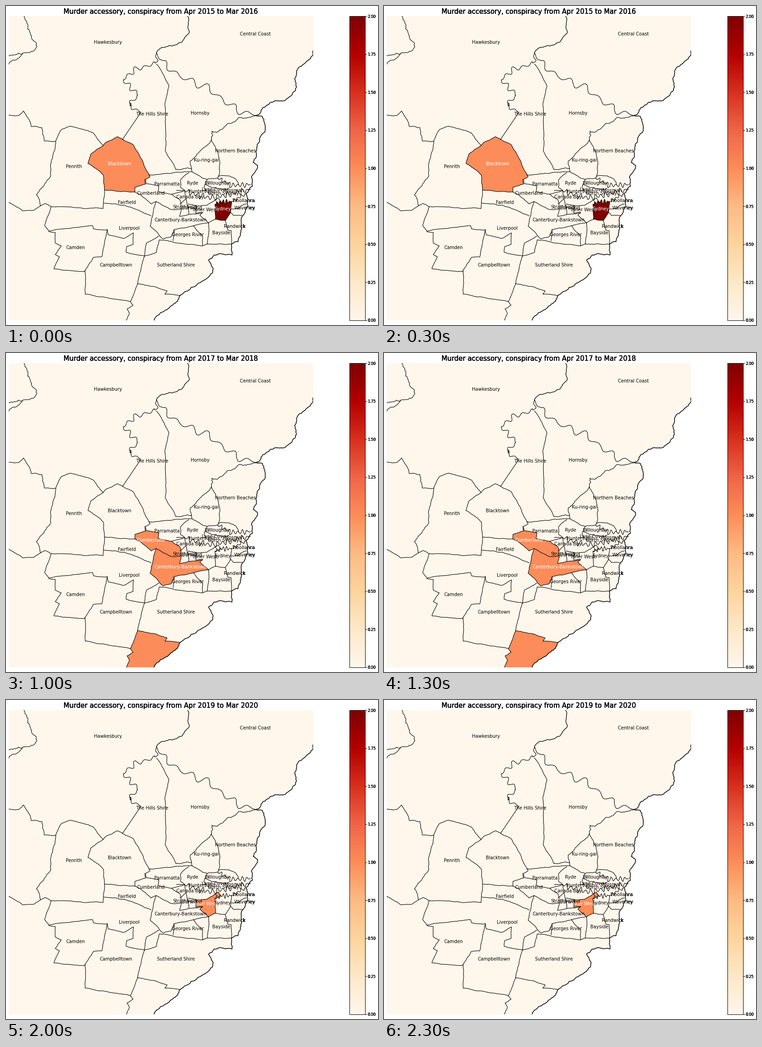
Animation, 808 px wide and 693 px high, one loop 2.5 s. Source, as a matplotlib script:

```python
import matplotlib.pyplot as plt
import numpy as np
from matplotlib.animation import FuncAnimation
from matplotlib.patches import Polygon, Rectangle

W, H, DPI = 808, 693, 64
PT = 72 / DPI  # points per pixel
LEFT, TOP, RIGHT, BOTTOM = 6, 22, 667, 683
OVERDRAW = 4  # repeated drawing makes some text heavier

# Largest sideways shift of a segment's middle, as a share of its length
CALM, COAST = 0.05, 0.15

plt.rcParams["font.family"] = "DejaVu Sans"
rng = np.random.default_rng(11)
cmap = plt.get_cmap("OrRd")

fig = plt.figure(figsize=(W / DPI, H / DPI), dpi=DPI, facecolor="white")
ax = fig.add_axes([0, 0, 1, 1])
ax.axis("off")
frame = Rectangle((LEFT, TOP), RIGHT - LEFT, BOTTOM - TOP, fc="none", ec="none")
ax.add_patch(frame)

arcs = {}


def fractal(a, b, rough):
    """Points from a up to b, split by random midpoint displacement."""
    d = b - a
    length = np.hypot(*d)
    if length < 4:
        return [a]
    shift = rough * min(length, 25) * rng.uniform(-1, 1)
    mid = (a + b) / 2 + np.array([-d[1], d[0]]) / length * shift
    return fractal(a, mid, rough) + fractal(mid, b, rough)


def draw(name, path, width):
    arcs[name] = path
    line, = ax.plot(*path.T, color="black", lw=width * PT, zorder=3)
    line.set_clip_path(frame)


def border(name, *pts, rough=CALM, width=1.1):
    """A land border or coast through a few key points."""
    pts = np.array(pts, float)
    path = [p for a, b in zip(pts, pts[1:]) for p in fractal(a, b, rough)]
    draw(name, np.array(path + [pts[-1]]), width)


def river(name, *pts, swing, period):
    """A line that swings in waves about its key points."""
    pts = np.array(pts, float)
    dist = np.r_[0, np.cumsum(np.hypot(*np.diff(pts, axis=0).T))]
    s = np.linspace(0, dist[-1], int(dist[-1]))
    path = np.column_stack([np.interp(s, dist, c) for c in pts.T])
    tangent = np.gradient(path, axis=0)
    tangent /= np.hypot(*tangent.T)[:, None]
    normal = tangent[:, ::-1] * [-1, 1]
    turn = 2 * np.pi * s / period
    fade = np.clip(np.minimum(s, s[-1] - s) / period, 0, 1)
    wave = swing * fade * np.sin(turn) * (1 + 0.5 * np.sin(0.37 * turn))
    draw(name, path + normal * wave[:, None], 1.1)


def join(*parts):
    """Chain arcs and points into an outline; a leading '-' reverses an arc."""
    out = []
    for part in parts:
        if isinstance(part, tuple):
            out.append([part])
        elif part[0] == "-":
            out.append(arcs[part[1:]][::-1])
        else:
            out.append(arcs[part])
    return np.vstack(out)


def area(*parts, zorder=2):
    patch = Polygon(join(*parts), fc=cmap(0.0), ec="none", zorder=zorder)
    ax.add_patch(patch)
    patch.set_clip_path(frame)
    return patch


def write(x, y, text, px, ha="center", va="baseline", zorder=5):
    return ax.text(x, y, text, fontsize=px * PT, ha=ha, va=va, zorder=zorder)


# Coast, north to south
coast = dict(rough=COAST, width=1.5)
border("coast_n", (675, 88), (667, 97), (656, 118), (636, 133), (627, 158),
       (631, 176), (611, 201), (575, 209), (543, 238), **coast)
border("coast_m", (543, 238), (557, 240), (563, 267), (549, 297), (537, 340),
       (546, 346), (533, 372), (535, 392), (521, 408), **coast)
border("coast_e", (521, 408), (525, 432), (511, 462), (510, 488), (504, 512),
       (490, 517), (491, 541), (452, 541), (440, 552), (450, 572), (428, 597),
       (378, 629), **coast)
border("coast_s", (378, 629), (342, 664), (322, 683), (314, 692), **coast)

# North
border("hawk_west", (33, 15), (47, 50), (66, 80), (61, 97), (36, 103),
       (0, 107), rough=0.2)
border("hawk_fork", (36, 103), (14, 118), (0, 140), rough=COAST)
border("hawk_cc", (399, 10), (397, 60), (372, 83), (338, 90), (327, 102),
       rough=COAST, width=1.3)
river("cc_horn", (327, 102), (340, 122), (376, 152), (436, 177), (480, 210),
      (500, 225), (543, 238), swing=6, period=36)
river("hawk_hills", (327, 102), (325, 125), (281, 138), (254, 160), (288, 194),
      (266, 215), (293, 231), swing=4, period=21)
border("hills_sw", (293, 231), (253, 290), rough=0)
border("hills_horn", (327, 126), (337, 140), (354, 174), (345, 215),
       (346, 315), (369, 355))
border("horn_kur", (369, 355), (403, 353), (400, 337), (424, 313), (446, 291),
       rough=0.1)
border("horn_beach", (446, 291), (447, 272), (473, 264), (500, 248),
       (543, 238), rough=0.2)
border("kur_beach", (446, 291), (463, 333), (460, 374), rough=0.1)
border("kur_ryde", (403, 353), (404, 360), (437, 377), (460, 374), rough=0.1)

# West
border("mountains", (0, 238), (28, 238), (38, 228), (55, 262), (78, 264),
       (83, 293), (108, 294), (101, 330), (97, 370), (66, 410), (75, 434),
       rough=0.1)
border("penrith_n", (108, 294), (121, 268), (140, 261), (190, 276), (211, 303))
border("penrith_s", (0, 424), (36, 445), (60, 444), (85, 429), (98, 436),
       (211, 440), (214, 400))
border("fair_liv", (213, 428), (258, 433), (315, 456))
border("liv_west", (98, 436), (84, 477), (93, 489), (188, 477), (190, 484),
       (220, 486))
border("camden", (93, 490), (107, 492), (107, 515), (120, 521), (107, 540),
       (116, 545), (104, 571), (170, 577), (190, 546), (208, 545), (220, 486))
border("camp_w", (172, 575), (172, 626), (270, 642))
border("camp_n", (220, 486), (222, 497), (255, 505), (277, 493), (276, 518),
       (262, 523), (261, 535), (301, 543))
border("camp_e", (301, 543), (286, 603))
border("liv_e", (301, 543), (305, 515), (332, 500))
border("suth_n", (301, 543), (327, 535), (333, 508), (388, 517), (427, 521),
       (437, 517), (490, 517))
border("gong_top", (286, 603), (325, 610), (350, 619), (345, 626), (378, 629))
border("gong_west", (286, 603), (270, 642), (276, 650), (263, 658),
       (268, 668), (258, 692))

# Middle
border("black", (280, 404), (214, 400), (212, 368), (196, 354), (178, 342),
       (184, 322), (211, 303), (217, 296), (242, 284), (277, 302), (298, 340),
       (313, 371), (302, 377))
border("black_cum", (302, 377), (303, 387), (280, 394), (280, 404))
border("cum_sw", (280, 404), (292, 410), (315, 430), (326, 425))
border("cum_cant", (326, 425), (358, 442), (381, 441))
border("cum_ne", (381, 441), (378, 421), (360, 409), (330, 403), (332, 391),
       (305, 386), (302, 377))
border("cant_n", (381, 441), (377, 457), (427, 449))
border("cant_inner", (427, 449), (421, 454), (440, 471))
border("cant_s", (440, 471), (420, 474), (365, 486), (358, 502), (341, 506),
       (327, 490), (313, 478), (320, 447), (326, 425))
border("inner_s", (440, 471), (455, 463))
border("inner_syd", (455, 463), (454, 431))
border("inner_n", (454, 431), (467, 426), (461, 417), (436, 433), (414, 434),
       (412, 450), (427, 449))
river("syd_shore", (454, 431), (468, 425), (490, 425), swing=4, period=7)
border("syd_e", (490, 425), (487, 450), (476, 466), (455, 463))
border("parra_n", (310, 367), (373, 361), (404, 360))
border("ryde_w", (397, 362), (379, 378), (379, 394), (388, 401), (370, 401))
border("parra_s", (360, 409), (388, 401))
border("ryde_e", (437, 377), (430, 395), (442, 410))
border("lane", (433, 388), (460, 397), (484, 396), rough=COAST)
border("strath", (388, 401), (391, 418), (378, 430))
border("burwood", (391, 418), (397, 452))
border("canada", (396, 430), (414, 434))
border("georges_w", (365, 486), (363, 510))
border("georges_e", (407, 477), (427, 500), (427, 521))
border("bay_w", (440, 471), (441, 485), (437, 517))

# Harbour and east
river("harbour", (388, 401), (420, 412), (447, 417), (490, 408), (531, 398),
      swing=5, period=11)
river("middle", (460, 374), (490, 390), (531, 388), swing=4, period=10)
river("shore", (490, 425), (521, 408), swing=3, period=9)
border("beach_s", (462, 370), (492, 372), (505, 388), rough=COAST)
border("wool_wav", (490, 441), (522, 430), rough=COAST)
border("wav_rand", (487, 447), (494, 455), (513, 455))
border("rand_bay", (476, 466), (482, 487), (489, 488), (490, 517))

area((-5, 10), (675, 10), "coast_n", "coast_m", "coast_e", "coast_s",
     (-5, 692), zorder=1)
regions = {
    "Central Coast": area("hawk_cc", "cc_horn", "-coast_n", (675, 10)),
    "Blacktown": area("black", "black_cum"),
    "Cumberland": area("black_cum", "cum_sw", "cum_cant", "cum_ne"),
    "Canterbury-Bankstown": area("cum_cant", "cant_n", "cant_inner", "cant_s"),
    "Inner West": area("cant_inner", "inner_s", "inner_syd", "inner_n"),
    "Sydney": area("inner_syd", "syd_shore", "syd_e"),
    "Wollongong": area("gong_top", "coast_s", "-gong_west"),
}

places = [
    ("Hawkesbury", 222, 79), ("Central Coast", 542, 60),
    ("The Hills Shire", 317, 234), ("Hornsby", 422, 232),
    ("Northern Beaches", 498, 315), ("Ku-ring-gai", 435, 334),
    ("Penrith", 147, 348), ("Blacktown", 247, 343), ("Parramatta", 350, 387),
    ("Ryde", 405, 384), ("Willoughby", 459, 384), ("Cumberland", 315, 407),
    ("Fairfield", 263, 427), ("Lane Cove", 451, 398),
    ("Hunters Hill", 425, 402), ("North Sydney", 473, 406),
    ("Mosman", 496, 401), ("Canada Bay", 400, 414), ("Strathfield", 388, 436),
    ("Burwood", 404, 439), ("Inner West", 432, 442), ("Sydney", 471, 441),
    ("Woollahra", 516, 423), ("Waverley", 519, 438), ("Randwick", 497, 478),
    ("Bayside", 468, 492), ("Georges River", 395, 497),
    ("Canterbury-Bankstown", 379, 464), ("Liverpool", 268, 483),
    ("Camden", 151, 525), ("Campbelltown", 239, 563),
    ("Sutherland Shire", 369, 562)]

# Copies under the land leave only the parts over the sea heavier
labels = {}
for name, x, y in places:
    for _ in range(OVERDRAW):
        write(x, y + 3.5, name, 9.85, zorder=0)
    labels[name] = write(x, y + 3.5, name, 9.85)

titles = [write(336.5, 17.2, "", 14.6) for _ in range(OVERDRAW)]

# Colour bar
BAR_L, BAR_R = 746, 780
ax.imshow(np.linspace(1, 0, 256)[:, None], cmap=cmap, vmin=0, vmax=1,
          extent=(BAR_L, BAR_R, BOTTOM, TOP), aspect="auto",
          interpolation="nearest")
ax.add_patch(Rectangle((BAR_L, TOP), BAR_R - BAR_L, BOTTOM - TOP, fc="none",
                       ec="black", lw=PT, zorder=4))
for value in np.arange(0, 2.01, 0.25):
    y = BOTTOM - (BOTTOM - TOP) * value / 2
    ax.plot([BAR_R, BAR_R + 3], [y, y], color="black", lw=PT)
    for _ in range(OVERDRAW):
        write(BAR_R + 5, y, f"{value:.2f}", 8.15, "left", "center_baseline")

ax.set_xlim(0, W)
ax.set_ylim(H, 0)

counts = [
    {"Blacktown": 1, "Sydney": 2},
    {"Central Coast": 1},
    {"Cumberland": 1, "Canterbury-Bankstown": 1, "Wollongong": 1},
    {"Central Coast": 1},
    {"Inner West": 1},
]


def update(i):
    year = 2015 + i
    for title in titles:
        title.set_text("Murder accessory, conspiracy from "
                       f"Apr {year} to Mar {year + 1}")
    for name, patch in regions.items():
        count = counts[i].get(name, 0)
        patch.set_facecolor(cmap(count / 2))
        if name in labels:
            labels[name].set_color("white" if count else "black")
    return []


anim = FuncAnimation(fig, update, frames=len(counts), interval=500,
                     repeat=True, repeat_delay=0, blit=False)
plt.show()
```
